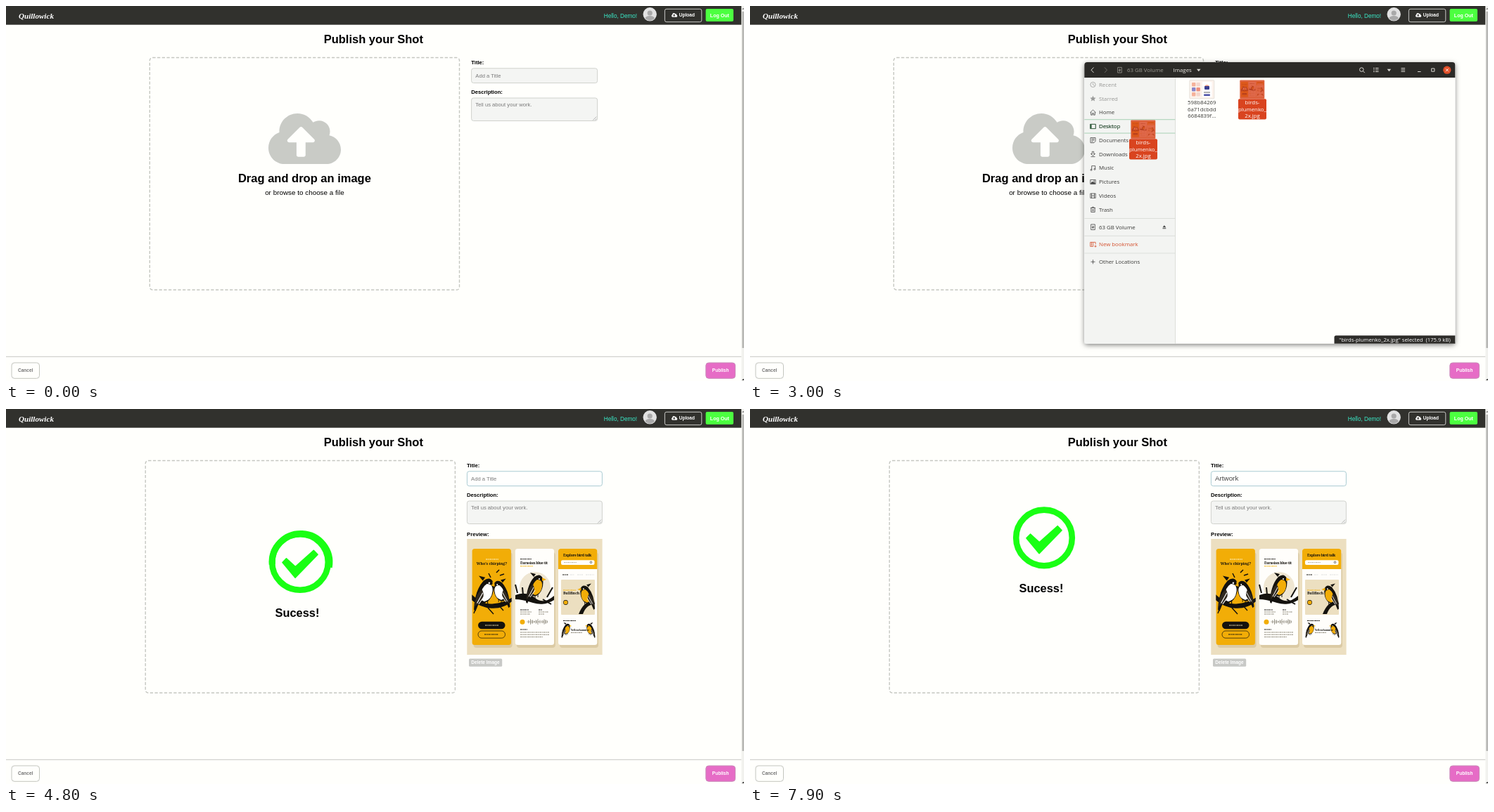
Write an HTML page that moves like this. It is 1049 by 534 pixels and loops after 8 s.

```html
<!DOCTYPE html>
<html lang="en">
<head>
<meta charset="utf-8">
<title>Publish your Shot</title>
<style>
html, body { margin: 0; width: 100%; height: 100%; overflow: hidden; background: #fffffc; }
svg { display: block; width: 100vw; height: 100vh; }
text { font-family: "Liberation Sans", Arial, sans-serif; white-space: pre; }
.b { font-weight: 700; }
.u { font-family: "Open Sans", "Noto Sans", sans-serif; }
.s { font-family: "Noto Serif", "Liberation Serif", serif; font-weight: 700; }
.logo { font: italic 700 11.1px "Liberation Serif", serif; }
.m { text-anchor: middle; }
.line { fill: none; stroke: #444; stroke-width: .8; }
</style>
</head>
<body>
<svg id="stage" viewBox="0 0 1049 534" preserveAspectRatio="none"></svg>
<script>
const LOOP = 8000, STEP = 100;
const GREEN = '#19ff14', RED = '#d9441f', GOLD = '#f2ad07', INK = '#14120e', CREAM = '#ecdfc0';

const text = (x, y, size, str, cls = '', fill = '#000', more = '') =>
  `<text x="${x}" y="${y}" font-size="${size}" class="${cls}" fill="${fill}" ${more}>${str}</text>`;
const rect = (x, y, w, h, fill, r = 0, more = '') =>
  `<rect x="${x}" y="${y}" width="${w}" height="${h}" rx="${r}" fill="${fill}" ${more}/>`;
const circle = (x, y, r, fill, more = '') => `<circle cx="${x}" cy="${y}" r="${r}" fill="${fill}" ${more}/>`;
const path = (d, fill = 'none', more = '') => `<path d="${d}" fill="${fill}" ${more}/>`;
const group = (id, body, more = '') => `<g id="${id}" ${more}>${body}</g>`;
const at = (x, y, body, scale = 1) => `<g transform="translate(${x} ${y}) scale(${scale})">${body}</g>`;
const border = (color, w = 1) => `stroke="${color}" stroke-width="${w}"`;

const CLOUD = 'M537.6 226.6c4.1-10.7 6.4-22.4 6.4-34.6 0-53-43-96-96-96-19.7 0-38.1 6-53.3 16.2C367 64.2 315.3 32 256 32c-88.4 0-160 71.6-160 160 0 2.7.1 5.4.2 8.1C40.2 219.8 0 273.2 0 336c0 79.5 64.5 144 144 144h368c70.7 0 128-57.3 128-128 0-61.9-44-113.6-102.4-125.4zM393.4 288H328v112c0 8.8-7.2 16-16 16h-48c-8.8 0-16-7.2-16-16V288h-65.4c-14.3 0-21.4-17.2-11.3-27.3l105.4-105.4c6.2-6.2 16.4-6.2 22.6 0l105.4 105.4c10.1 10.1 2.9 27.3-11.3 27.3z';
const cloud = (x, y, width, fill) => at(x, y, path(CLOUD, fill), width / 640);

function pageFrame() {
  return rect(0, 0, 1049, 534, '#fffffc') +
    rect(0, 0, 1045.5, 26.7, '#31312d') +
    text(18, 17.5, 11.1, 'Quillowick', 'logo', '#fff') +
    text(849.8, 16.5, 8.2, 'Hello, Demo!', '', '#3ae8c6') +
    circle(915.2, 11.8, 9.7, '#e2e2e2') + circle(915.2, 10, 3.6, '#a9a9a9') +
    path('M908.4 17.6q1.2-3.6 6.8-3.6t6.8 3.6a9 9 0 0 1-13.6 0z', '#a9a9a9') +
    rect(936.4, 4.3, 52.4, 18.4, 'none', 2.5, border('#c9c9c5')) +
    cloud(946, 9.7, 8.2, '#fff') + text(956.8, 15.4, 6.56, 'Upload', 'b', '#fff') +
    rect(994.6, 4, 39.4, 18, '#4cff40', 2) + text(1000.8, 15.5, 7.1, 'Log Out', 'b', '#fff') +
    text(522.3, 52.5, 16.5, 'Publish your Shot', 'b m') +
    rect(0, 498.8, 1045.5, 1.2, '#d0d1cd') +
    rect(8, 508, 39.5, 22.3, '#fffffc', 4, border('#c3c5bf')) + text(27.7, 521.3, 6.56, 'Cancel', 'b m', '#777') +
    rect(994.8, 508, 41.8, 22.3, '#e66cc6', 4, border('#c98bb8')) + text(1015.6, 521.3, 6.56, 'Publish', 'b m', '#fff') +
    rect(1045.5, 0, 3.5, 534, '#f1f1ee') + rect(1046.3, 8, 2.7, 479, '#b8b8b6') +
    path('M1046 533l1.5-2h1.5v2z', '#555') + path('M1046 5l1.5-2h1.5v2z', '#999');
}

const zone = (x, id) => rect(x, 73.5, 440.2, 330.8, 'none', 4,
  `id="${id}" ${border('#c5c7c1', 1.4)} stroke-dasharray="4.3 2.4"`);

function form(x, w, id) {
  const grip = x + w - 1;
  return text(x, 82.8, 7.65, 'Title:', 'b') +
    rect(x + .3, 88.8, w, 20.8, '#f4f5f3', 3, `id="${id}Input" ${border('#d0d2cd')}`) +
    text(x + 6, 102.2, 7.65, 'Add a Title', '', '#7b7b7b', `id="${id}Hint"`) +
    text(x, 125.2, 7.65, 'Description:', 'b') +
    rect(x + .3, 131, w, 32.5, '#f4f5f3', 3, border('#d0d2cd')) +
    text(x + 6, 143, 7.65, 'Tell us about your work.', '', '#7b7b7b') +
    path(`M${grip - 5} 162.6l5-5m-2 5l2-2`, 'none', border('#888', .6));
}

// Bird facing right, about 30 units tall, feet near the origin.
const bird = (x, y, scale, flip = 1, belly = '#fff') =>
  `<g transform="translate(${x} ${y}) scale(${scale * flip} ${scale})">` +
  path('M-13 12Q-12-12-1-24Q7-30 11-22Q13-8 6 0Q0 6-6 2L-11 14z', INK) +
  path('M-4 0Q-6-14 3-20Q11-20 10-11Q9 0 0 2z', belly) +
  path('M-12 8Q-11-8-3-13Q2-4-6 3z', '#30291f') +
  path('M-9 4L-2-9M-7 5L0-5', 'none', border('#fff', 1)) +
  path('M-2-24l-5-6 8 2z', INK) + path('M10-23l6 3-6 2z', GOLD) + circle(6, -21, 1.1, '#fff') +
  path('M0 2v5m4-7v5', 'none', border(INK, 1)) + '</g>';

const words = (x, y, w, color = '#8b8678') =>
  `<path d="M${x} ${y}h${w}" stroke="${color}" stroke-width="1" stroke-dasharray="2.6 .7 1.6 .6"/>`;

function artwork() {
  const card = (x, fill) => rect(x + 2, 204, 55, 136, '#a98d4f', 4, 'opacity=".25"') + rect(x, 199, 55.3, 137, fill, 3.5);
  const wave = Array.from({ length: 20 }, (_, i) => {
    const h = .6 + 3.6 * Math.abs(Math.sin(i * 1.7) * Math.sin(i * .48));
    return `M${741 + i * 1.5} ${303 - h}v${2 * h}`;
  }).join('');
  return rect(655.3, 185, 192.3, 165, CREAM) +
    card(662.6, GOLD) + words(682, 214, 18, '#fff3c8') + text(690.5, 221.5, 5.3, 'Who’s chirping?', 's m', INK) +
    path('M663 266q14 14 30 12t25-8v4q-12 10-28 9t-27-11zM670 278l-5 13M684 282l9 10M699 278l8 9M710 275l6 6', INK, border(INK, 1.4)) +
    path('M697 233l4-4M689 240l-3-6M702 237l6-2', 'none', border(INK, 1.5)) +
    bird(680, 272, 1.15) + bird(704, 270, .95, -1) +
    rect(671, 302.7, 38.5, 10.6, INK, 5.3) + words(681, 308, 19, '#e8d9ab') +
    rect(671, 316, 38.5, 10.2, 'none', 5, border(INK, .7)) + words(680, 321, 20, INK) +
    card(723.8, '#fffefb') + words(731, 213.7, 16, INK) + text(731, 220.8, 5, 'Eurasian blue tit', 's', INK, 'letter-spacing="-.2"') +
    words(731, 223.8, 18, GOLD) + circle(752, 254, 22, '#efe6d2') +
    path('M724 265q16-6 28 4t27-3v6q-14 9-30 4t-25-5z', INK) +
    path('M727 262l-3-12M735 265l-1-11M769 268l8-14M763 271l12 7', 'none', border(INK, 2)) +
    bird(752, 263, 1, 1, GOLD) +
    words(731, 286, 12, INK) + words(757, 286, 5, INK) + words(731, 289, 16) + words(731, 292, 14) + words(757, 289, 14) + words(757, 292, 8) +
    circle(734, 303.2, 3.5, GOLD) + path(wave, 'none', border('#65604f', .6)) +
    words(731, 314, 10, INK) + [318, 321.3, 324.6].map(y => words(731, y, y > 324 ? 32 : 41)).join('') +
    card(785, '#fffefb') + path('M785 228v-25.500q0-3.500 3.500-3.500h48.300q3.500 0 3.500 3.500V228z', GOLD) +
    text(792, 210.3, 5, 'Explore bird talk', 's', INK, 'letter-spacing="-.2"') +
    rect(789, 215.2, 47.5, 6.8, '#fffefb', 2) + words(793, 218.6, 18, '#bbb5a3') + circle(831.5, 218.3, 1.3, 'none', border(INK, .6)) +
    words(791, 236, 8, INK) + words(802, 236, 6, '#ddd') + words(812, 236, 8, '#ddd') + words(824, 236, 12, '#ddd') +
    rect(789, 243, 48, 50, CREAM, 1) + words(792, 258, 18, GOLD) + text(792, 264.3, 5, 'Bullfinch', 's', INK) +
    circle(795.5, 275.5, 3.4, INK) + circle(795.5, 275.5, 2.8, GOLD) +
    path('M814 292q8-20 22-18l1 4q-12 0-17 14z', INK) + bird(826, 274, .85, -1, GOLD) +
    words(792, 301.5, 18, INK) + bird(796, 319, .5, 1, GOLD) + bird(831, 319, .5, -1, GOLD) +
    text(803, 316, 3.4, 'Yellowhammer', 's', INK) + words(803, 318.5, 16);
}

const ICONS = {
  recent: '<circle r="3.6"/><path d="M0-2V0L2 1.500"/>',
  star: '<path d="M0-4l1.200 2.700 2.900.3-2.200 1.900.7 2.900L0 2.300l-2.600 1.500.7-2.900-2.200-1.900 2.900-.3z" fill="currentColor" stroke="none"/>',
  home: '<path d="M-4 .2L0-3.600 4 .2M-2.800-.6V3.600h2V1h1.600v2.600h2V-.6"/>',
  desktop: '<path d="M-3.800-3h7.600v6.200h-7.600z"/><path d="M-3-3v6" stroke-width="1.800"/>',
  documents: '<path d="M-3.500-3.600h7v5l-2 2.200h-5zM-2-1.800h4M-2 0h4M-2 1.800h2"/>',
  downloads: '<path d="M-1.200-3.600h2.400v3.200h1.800L0 2.400-3-.4h1.800zM-3 3.700h6"/>',
  music: '<path d="M-1.800 2.500v-5.500h5v4.500"/><circle cx="-2.500" cy="2.700" r="1"/><circle cx="2.400" cy="1.700" r="1"/>',
  pictures: '<path d="M-3.700-3h7.400v6.200h-7.400z"/><path d="M-3 2.500l2-3 1.500 1.500 1-1 1.500 2.500z" fill="currentColor"/><circle cx="1.600" cy="-1.300" r=".5"/>',
  videos: '<path d="M-3.700-3.200h7.400v6.400h-7.400zM-2-3.200v6.400M2-3.200v6.400M-2 0h4"/>',
  trash: '<path d="M-3.500-2.500h7M-1.200-2.500v-1.200h2.400v1.200M-2.700-2.500v6h5.400v-6M-.8-.8v3M.8-.8v3"/>',
  volume: '<path d="M-2.800-3.800h5.600v7.600h-5.600zM0-2v4.200M-1.300-.5v1L0 1.300 1.300.2v-1"/>',
  bookmark: '<path d="M-3.800-3.200h4v6h-4zM.2-3.200h3.400v3M-2-3v5M2 2.600h3M3.500 1v3"/>',
  plus: '<path d="M-3 0h6M0-3v6"/>'
};
const icon = (name, x, y, color = '#444') =>
  at(x, y, `<g class="line" style="stroke:${color};color:${color}">${ICONS[name]}</g>`);
const label = (x, y, str, color = '#3a3a38', cls = 'u') => text(x, y + 2.8, 7.85, str, cls, color);
const row = (name, str, y, color) => icon(name, 487.5, y, color) + label(496, y, str, color);
const rule = y => rect(475.5, y - .4, 129, .8, '#d8dad5');

const fileName = (x, lines, color) => lines.map((s, i) => text(x, 140.3 + i * 9.3, 7.8, s, 'u m', color)).join('');
const birdThumb = '<svg x="696.5" y="105.800" width="34.800" height="26" viewBox="655.300 185 192.300 165" preserveAspectRatio="none"><use href="#art"/></svg>';
const birdName = ['birds-', 'plumenko_', '2x.jpg'];
const selectedFile = birdThumb + rect(696.3, 105.5, 35, 26.6, RED, 1, 'opacity=".8"') +
  rect(694, 132.3, 40, 29.2, RED, 2) + fileName(714, birdName, '#fff');

function pinkThumb() {
  const tile = i => rect(628 + (i % 2) * 6.5, 109 + (i >> 1) * 7, 5.4, 5.6, ['#f6b29a', '#f4d6cd', '#8c86c9', '#ee8f7c'][i % 4], 1);
  return rect(624.8, 105.8, 35, 26, '#fdf3ec', 1, border('#d6d0ca', .6)) + [0, 1, 2, 3, 4, 5].map(tile).join('') +
    rect(643, 108, 13.5, 22, '#fff', 1) + circle(649.5, 115.5, 3.3, '#f2a48c') + rect(646, 114, 7, 5, '#3b3f8f', 1) +
    rect(645, 122.5, 9, 1, '#666') + rect(645, 125.5, 9, 2.5, '#4a4fa6', 1);
}

function fileWindow() {
  const places = ['Home', 'Desktop', 'Documents', 'Downloads', 'Music', 'Pictures', 'Videos', 'Trash'];
  const head = '#d8d6d1', gray = '#9b9992';
  return rect(475.3, 80, 527, 400.7, '#fffffc', 4, 'filter="url(#shadow)"') +
    rect(475.3, 102, 129, 378.7, '#f3f4f2') + rect(604, 102, .8, 378.7, '#d5d7d2') +
    path('M475.3 102V84q0-4 4-4h519q4 0 4 4v18z', '#2b2a27') +
    path('M488.500 87.500l-3.500 3.700 3.500 3.700', 'none', border(head)) + path('M504 87.500l3.500 3.700-3.500 3.700', 'none', border('#6b6963')) +
    icon('volume', 525.5, 91.2, gray) + label(536, 91.2, '63 GB Volume', gray) +
    label(601.5, 91.2, 'Images', '#eceae5') + path('M635 89.800h5.600l-2.800 3.400zM905.600 89.800h5.600l-2.800 3.400z', head) +
    circle(869.3, 90.6, 2.8, 'none', border(head)) +
    path('M871.300 92.600l2.500 2.500M889 88.500h4.500M889 91h4.500M889 93.500h4.500M886 88.500h1.800M886 91h1.800M886 93.500h1.800M925.500 88.700h5.600M925.500 91h5.600M925.500 93.300h5.600M949 93.500h4.500M968.700 89h4.200v4.200h-4.200z', 'none', border(head)) +
    circle(990.8, 91.2, 5.6, '#e2502a') + path('M988.800 89.200l4 4m0-4l-4 4', 'none', border('#fff', .9)) +
    group('virtualPlaces', row('recent', 'Recent', 112) + row('star', 'Starred', 131.8)) +
    places.map((p, i) => row(p.toLowerCase(), p, 151.6 + i * 19.77)).join('') +
    group('dropTarget', rect(475.3, 161.3, 129, .9, '#9fcdae') + rect(475.3, 180.6, 129, .9, '#9fcdae') + row('desktop', 'Desktop', 171.4, '#3b6b48')) +
    rule(302.6) + row('volume', '63 GB Volume', 314.8) + path('M586.500 315.200l2.400-3 2.400 3zM586.500 316.300h4.800v1h-4.800z', '#444') + rule(327.3) +
    group('newBookmark', row('bookmark', 'New bookmark', 339.6, '#d4502d') + rule(352)) +
    group('others', row('plus', 'Other Locations', 339.6)) +
    pinkThumb() + fileName(642.3, ['598b84269', '6a71dcbdd', '6684839f…'], '#3a3a38') +
    group('plainFile', birdThumb + fileName(714, birdName, '#3a3a38')) +
    rect(696.5, 105.8, 34.8, 26, '#fff', 0, 'id="hover" opacity=".15"') +
    group('pickedFile', selectedFile) +
    group('status', path('M830.500 480.700v-9q0-2.500 2.500-2.500h169.300v11.500z', '#2e2d2a') +
      text(916.5, 478, 7.7, '"birds-plumenko_2x.jpg" selected  (175.9 kB)', 'u m', '#fff'));
}

const polar = (deg, r) => [r * Math.cos(deg * Math.PI / 180), r * Math.sin(deg * Math.PI / 180)].map(v => v.toFixed(2)).join(' ');
const SPINNER = `M${polar(-194, 40.8)}A40.8 40.8 0 1 1 ${polar(0, 40.8)}`;

const stage = document.getElementById('stage');
stage.innerHTML =
  `<defs><filter id="shadow" x="-5%" y="-5%" width="110%" height="110%"><feDropShadow dx="0" dy="2" stdDeviation="3.5" flood-opacity=".5"/></filter>${group('art', artwork())}</defs>` +
  pageFrame() +
  group('before', zone(204.3, 'emptyZone') + cloud(373, 147.8, 103, '#c9cbc6') +
    text(424.4, 251, 16.5, 'Drag and drop an image', 'b m') + text(424.4, 269, 9.9, 'or browse to choose a file', 'm') +
    form(661.3, 179, 'empty')) +
  group('after', zone(198.2, 'filledZone') + form(655.1, 192, 'title') +
    text(661, 102.3, 9.84, '', '', '#444', 'id="typed"') +
    text(655.1, 180.6, 7.65, 'Preview:', 'b') + '<use id="preview" href="#art"/>' +
    rect(658, 355.4, 47.2, 11.4, '#c8c9c6', 1.5) + text(681.5, 363.4, 6.56, 'Delete Image', 'b m', '#fff') +
    path(SPINNER, 'none', `id="spinner" ${border(GREEN, 9.2)}`) +
    group('result', circle(418, 218, 39.8, 'none', border(GREEN, 8.6)) +
      path('M393 218.500l5.500-5.700 12.800 11.700 26-23.200 5.800 6-32 33z', GREEN, border(GREEN, 1.6) + ' stroke-linejoin="round"') +
      text(414, 295.5, 16.4, 'Sucess!', 'b m')) +
    rect(0, 0, .8, 0, '#222', 0, 'id="caret"')) +
  group('window', fileWindow()) + group('dragged', selectedFile);

const el = {};
stage.querySelectorAll('[id]').forEach(node => el[node.id] = node);
const show = (id, on) => el[id].setAttribute('display', on ? 'inline' : 'none');
const set = (id, attrs) => { for (const k in attrs) el[id].setAttribute(k, attrs[k]); };
const clamp = v => Math.min(1, Math.max(0, v));
const KEY_TIMES = [5900, 6000, 6300, 6400, 6600, 6700, 6900];

function drawWindow(t) {
  show('window', t >= 800 && t < 3700);
  const grow = 1 - (1 - clamp((t - 700) / 400)) ** 2, scale = .92 + .08 * grow;
  set('window', { opacity: grow, transform: `translate(739 280) scale(${scale}) translate(-739 -280)` });
  const picked = t >= 1900, bookmark = t >= 2900 && t < 3500;
  show('hover', t >= 1700 && !picked);
  show('plainFile', !picked);
  show('pickedFile', picked);
  show('status', t >= 2100);
  show('newBookmark', bookmark);
  set('others', { transform: `translate(0 ${bookmark ? 24.7 : 0})` });
  set('virtualPlaces', { opacity: t >= 2900 && t < 3300 ? .5 : 1 });
  show('dropTarget', t === 3000);

  show('dragged', t >= 2800 && t < 3500);
  const p = clamp((t - 2700) / 600), glide = p * p * (3 - 2 * p);
  set('dragged', { transform: `translate(${-15 - 280 * glide} ${72.5 * (1 - (1 - p) ** 2.22)})` });
}

function drawUpload(t) {
  const started = t >= 3700, done = t >= 4300, settled = t >= 6500;
  show('before', !started);
  show('after', started);
  set('filledZone', { stroke: done ? '#c5c7c1' : '#d977bf' });
  set('titleInput', { fill: done ? '#fffffe' : '#f4f5f3', stroke: done ? '#a9cbd2' : '#d0d2cd' });
  show('preview', done);
  show('result', done);
  set('result', { transform: `translate(0 ${settled ? -34.6 : 0})` });
  show('spinner', !settled);
  set('spinner', { transform: `translate(419 218.400) rotate(${61 + .608 * (t - 3700)})` });

  const typed = 'Artwork'.slice(0, KEY_TIMES.filter(k => t >= k).length);
  el.typed.textContent = typed;
  show('titleHint', !typed);
  const inText = t >= 7300, blinkOn = Math.floor((t - 4300) / 500) % 2 === 0;
  show('caret', done && (inText ? t < 7900 : typed || blinkOn));
  if (inText) set('caret', { x: 661.2, y: 136, height: 10.5 });
  else if (typed) set('caret', { x: 661 + el.typed.getComputedTextLength(), y: 93.3, height: 11.4 });
  else set('caret', { x: 661, y: 94.5, height: 9.5 });
}

const start = performance.now();
function frame() {
  const elapsed = (performance.now() - start) % LOOP;
  const t = Math.floor(elapsed / STEP) * STEP;
  drawWindow(t);
  drawUpload(t);
  requestAnimationFrame(frame);
}
frame();
</script>
</body>
</html>
```
